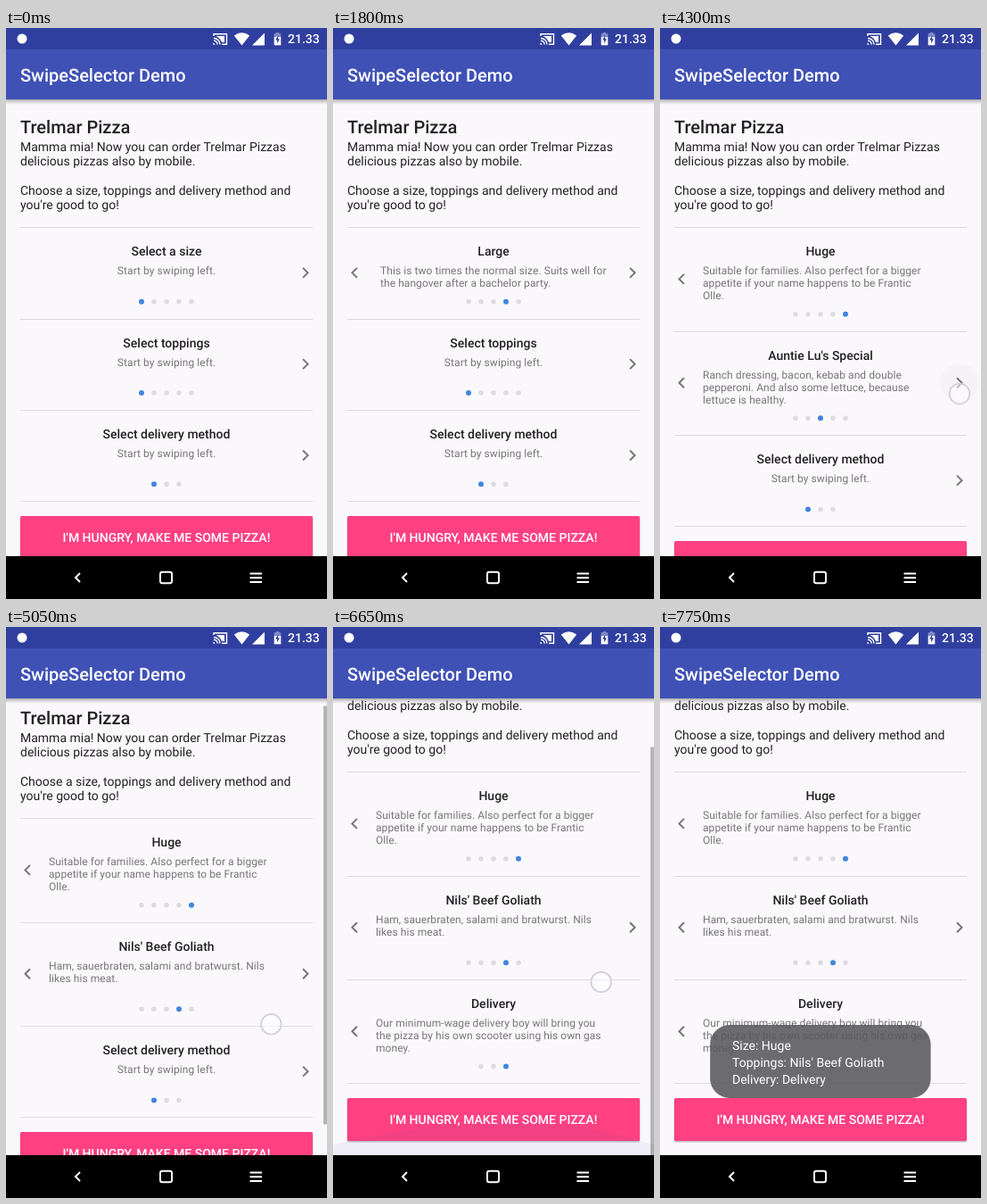
An HTML page for the animation above (8000 ms loop, 360 by 640 pixels).

```html
<!DOCTYPE html>
<html lang="en">
<head>
<meta charset="utf-8">
<title>SwipeSelector Demo</title>
<style>
  html, body { margin: 0; width: 100%; height: 100%; overflow: hidden; background: #000; }
  svg { display: block; }
  text { font-family: Roboto, "Open Sans", sans-serif; font-size: 14px; fill: #212121; text-rendering: geometricPrecision; }
  .medium { font-weight: 500; }
  .big { font-size: 20px; }
  .desc { font-size: 12px; fill: #757575; letter-spacing: .065px; }
  .light { fill: #fff; }
  .mid { text-anchor: middle; }
  .stroke { fill: none; stroke-width: 2; }
</style>
</head>
<body>
<svg id="stage" width="100%" height="100%" viewBox="0 0 360 640">
  <defs>
    <clipPath id="body"><rect y="80" width="360" height="512"/></clipPath>
    <linearGradient id="shade" x2="0" y2="1">
      <stop offset="0" stop-color="#000" stop-opacity=".32"/>
      <stop offset=".5" stop-color="#000" stop-opacity=".12"/>
      <stop offset="1" stop-color="#000" stop-opacity="0"/>
    </linearGradient>
  </defs>
  <rect width="360" height="592" fill="#fbf8fc"/>
  <g clip-path="url(#body)">
    <g id="content">
      <text class="big medium" x="16" y="117.7">Trelmar Pizza</text>
      <g id="intro"></g>
    </g>
    <path id="glow" fill="#3f51b5"/>
    <rect id="bar" x="356" width="4" fill="#000"/>
    <rect y="80" width="360" height="6" fill="url(#shade)"/>
  </g>

  <rect width="360" height="24" fill="#303f9f"/>
  <rect y="24" width="360" height="56" fill="#3f51b5"/>
  <text class="big medium light" x="16" y="59.7">SwipeSelector Demo</text>
  <circle cx="18" cy="12" r="5.5" fill="#fff"/>
  <g class="stroke" stroke="#fff" style="stroke-width:1.4">
    <path d="M233 9V6.7H247.5V18.3H242M233 11.5a7 7 0 0 1 7 7M233 14.3a4.2 4.2 0 0 1 4.2 4.2"/>
  </g>
  <path d="M235.5 9H245V16H242Q240 11 235.5 9ZM232.4 16.8a2 2 0 0 1 2 2h-2ZM264.5 19.5L255.8 8.4Q264.5 2 273.2 8.4ZM276 19.5H290V5.5Z" fill="#fff"/>
  <path d="M302.8 6.3V5H306.2V6.3H308.3V10H300.7V6.3Z" fill="#fff" opacity=".4"/>
  <path d="M300.7 10H308.3V19.3H300.7Z" fill="#fff"/>
  <path d="M305.2 8.5L302.2 13.6H304.1V17.4L306.9 12.2H305.2Z" fill="#303f9f"/>
  <text class="medium light" x="316" y="17">21.33</text>

  <rect y="592" width="360" height="48" fill="#000"/>
  <g class="stroke" stroke="#fff">
    <path d="M83 611L78 616L83 621M273.5 611.5H287M273.5 616.3H287M273.5 621H287"/>
    <rect x="173" y="609.7" width="13" height="12.6" rx="2.2"/>
  </g>

  <g id="toast">
    <rect x="56.2" y="446" width="247.4" height="82" rx="22" fill="#58585a" opacity=".87"/>
  </g>
  <circle id="touch" r="11.3" fill="#fff" fill-opacity=".5" stroke="#d0cde0" stroke-width="1.7"/>
</svg>
<script>
const LOOP = 8000, PAGE = 328, TOP = 223.2, SHORT = 102.3, GROW = 14.1;
const byId = id => document.getElementById(id);
const clamp = v => Math.max(0, Math.min(1, v));
const ramp = (t, a, b) => clamp((t - a) / (b - a));
const smooth = v => v * v * (3 - 2 * v);
const quintOut = v => 1 - (1 - v) ** 5;

function set(node, attrs) {
  for (const k in attrs) node.setAttribute(k, attrs[k]);
  return node;
}
function add(parent, tag, attrs, text) {
  const node = set(document.createElementNS('http://www.w3.org/2000/svg', tag), attrs);
  if (text) node.textContent = text;
  return parent.appendChild(node);
}
const shift = (node, x, y) => set(node, { transform: `translate(${x} ${y})` });

const HINT = ['Start by swiping left.'];
const swipe = (start, y, drag = 200, settle = 280) =>
  ({ start, pick: start + drag, end: start + drag + settle, half: .5, from: [285, y], to: [115, y + 12] });
const tap = (start, x, y) =>
  ({ start, pick: start + 100, end: start + 300, half: 0, from: [x, y], to: [x, y], tap: true });

// "tall" is the page whose selection makes the selector one line taller.
const specs = [
  { tall: 4, moves: [swipe(350, 284), swipe(850, 286), swipe(1320, 288), swipe(1950, 286, 220, 350)], pages: [
    ['Select a size', HINT],
    ["Kids' size", ['For the small appetite. For children under', '12 years only.']],
    ['Normal', ['Our most popular size. Ideal for kids before', 'their growth spurt.']],
    ['Large', ['This is two times the normal size. Suits well for', 'the hangover after a bachelor party.'], 37],
    ['Huge', ['Suitable for families. Also perfect for a bigger', 'appetite if your name happens to be Frantic', 'Olle.']]
  ] },
  { tall: 1, moves: [tap(3345, 337, 389), tap(3845, 336, 402), tap(4260, 336, 410)], pages: [
    ['Select toppings', HINT],
    ['Plain and simple', ['Tomato sauce, cheese and a bit of oregano.', 'Nothing else, because sometimes that is all', 'you need.']],
    ["Auntie Lu's Special", ['Ranch dressing, bacon, kebab and double', 'pepperoni. And also some lettuce, because', 'lettuce is healthy.']],
    ["Nils' Beef Goliath", ['Ham, sauerbraten, salami and bratwurst. Nils', 'likes his meat.']],
    ['Surprise', HINT]
  ] },
  { tall: 2, moves: [swipe(5750, 458, 150, 200), swipe(6070, 458, 150, 220)], pages: [
    ['Select delivery method', HINT],
    ['Pick up', ['Come and get your pizza from our place', 'while it is still hot.']],
    ['Delivery', ['Our minimum-wage delivery boy will bring you', 'the pizza by his own scooter using his own gas', 'money.']]
  ] }
];

const touches = [
  ...specs.flatMap(s => s.moves),
  { start: 4950, pick: 5270, from: [296, 470], to: [302, 365] },
  { start: 6400, pick: 6700, from: [298, 462], to: [301, 393] },
  { start: 7390, pick: 7490, from: [190, 556], to: [190, 556] }
];

const content = byId('content');
['Mamma mia! Now you can order Trelmar Pizzas', 'delicious pizzas also by mobile.', '',
 'Choose a size, toppings and delivery method and', "you're good to go!"]
  .forEach((s, i) => add(byId('intro'), 'text', { x: 16, y: 137.8 + i * 16.25 }, s));

function divider() {
  return add(content, 'rect', { x: 16, width: PAGE, height: 1, fill: '#dcdbdf' });
}

function buildSelector(spec) {
  const line = divider();
  const root = add(content, 'g', {});
  const pager = add(root, 'svg', { x: 16, width: PAGE, height: 118, overflow: 'hidden' });
  const strip = add(pager, 'g', {});
  spec.pages.forEach(([title, lines, left = 32], i) => {
    const x = i * PAGE, mid = x + PAGE / 2;
    add(strip, 'text', { class: 'medium mid', x: mid, y: 32.2 }, title);
    lines.forEach((s, j) => add(strip, 'text', lines.length > 1
      ? { class: 'desc', x: x + left, y: 53 + j * 14 }
      : { class: 'desc mid', x: mid, y: 53 }, s));
  });
  const n = spec.pages.length;
  const dots = spec.pages.map((_, i) => add(root, 'circle', { cx: 180 + (i - (n - 1) / 2) * 14 }));
  const ripple = add(root, 'circle', { cx: 336, fill: '#000' });
  const [prev, next] = ['M27 -5.5L21.5 0L27 5.5', 'M333 -5.5L338.5 0L333 5.5']
    .map(d => add(root, 'path', { d, class: 'stroke', stroke: '#757575' }));
  return { ...spec, line, root, strip, dots, ripple, prev, next };
}

const selectors = specs.map(buildSelector);
const lastLine = divider();
const button = add(content, 'g', {});
add(button, 'rect', { x: 16, y: 2, width: PAGE, height: 48, rx: 2, fill: '#000', opacity: .12 });
add(button, 'rect', { x: 15.5, y: 1, width: PAGE + 1, height: 48, rx: 2, fill: '#000', opacity: .14 });
add(button, 'rect', { x: 16, width: PAGE, height: 48, rx: 1.5, fill: '#ff4081' });
const press = add(button, 'rect', { x: 16, width: PAGE, height: 48, rx: 1.5, fill: '#fff' });
add(button, 'text', { class: 'medium light mid', x: 180, y: 29.2 }, "I'M HUNGRY, MAKE ME SOME PIZZA!");

['Size: Huge', "Toppings: Nils' Beef Goliath", 'Delivery: Delivery']
  .forEach((s, i) => add(byId('toast'), 'text', { class: 'light', x: 81, y: 473.5 + i * 19 }, s));

function progress(m, t) {
  if (t < m.pick) return m.half * smooth(ramp(t, m.start, m.pick));
  return m.half + (1 - m.half) * quintOut(ramp(t, m.pick, m.end));
}

function drawSelector(s, t, top) {
  const done = s.moves.filter(m => t >= m.pick);
  const index = done.length, last = s.pages.length - 1;
  const h = SHORT + (index >= s.tall ? GROW : 0);
  set(s.line, { y: Math.round(top) });
  shift(s.root, 0, top);
  shift(s.strip, -PAGE * s.moves.reduce((sum, m) => sum + progress(m, t), 0), 0);
  s.dots.forEach((d, i) => set(d, {
    cy: h - 18.8, r: i === index ? 3 : 2.8, fill: i === index ? '#4285dc' : '#dddce0'
  }));
  const fade = index ? ramp(t, done[index - 1].pick, done[index - 1].pick + 120) : 1;
  set(s.prev, { transform: `translate(0 ${h / 2})`, opacity: index ? (index === 1 ? fade : 1) : 0 });
  set(s.next, { transform: `translate(0 ${h / 2})`, opacity: index === last ? 1 - fade : 1 });
  const hit = s.moves.find(m => m.tap && t >= m.start && t < m.start + 390);
  const age = hit ? t - hit.start : 0;
  set(s.ripple, { cy: h / 2, r: 18 + 8 * ramp(age, 0, 90), opacity: .03 * ramp(age, 0, 60) * (1 - ramp(age, 150, 390)) });
  return top + h;
}

// Fades in from a to b, stays until c, is gone at d.
const pulse = (t, a, b, c, d) => ramp(t, a, b) * (1 - ramp(t, c, d));

function draw(t) {
  let y = TOP;
  for (const s of selectors) y = drawSelector(s, t, y);
  set(lastLine, { y: Math.round(y) });
  shift(button, 0, Math.round(y + 16.7));

  const total = y + 80.7 - 80;
  const scroll = 47 * smooth(ramp(t, 4980, 5230)) + GROW * smooth(ramp(t, 6430, 6600));
  shift(content, 0, -Math.round(scroll));

  const barAlpha = pulse(t, 4980, 5010, 5700, 5950) + pulse(t, 6430, 6460, 7050, 7300);
  set(byId('bar'), { y: 80 + scroll * 512 / total, height: 512 * 512 / total, opacity: .28 * barAlpha });

  const glow = pulse(t, 5200, 5290, 5290, 5640) + pulse(t, 6570, 6680, 6720, 7300);
  const edge = 592 - 16 * glow, crest = 592 - 85 * glow;
  set(byId('glow'), { d: `M0 592V${edge}Q205 ${crest} 360 ${edge}V592Z`, opacity: .08 * glow });

  set(press, { opacity: .18 * pulse(t, 7400, 7480, 7520, 7740) });
  set(byId('toast'), { opacity: smooth(ramp(t, 7480, 7750)) });

  const f = touches.find(m => t >= m.start && t < m.pick);
  const touch = byId('touch');
  touch.style.display = f ? '' : 'none';
  if (f) {
    const k = smooth(ramp(t, f.start, f.pick));
    set(touch, { cx: f.from[0] + (f.to[0] - f.from[0]) * k, cy: f.from[1] + (f.to[1] - f.from[1]) * k });
  }
}

const begin = performance.now();
function frame() {
  draw((performance.now() - begin) % LOOP);
  requestAnimationFrame(frame);
}
frame();
</script>
</body>
</html>
```
